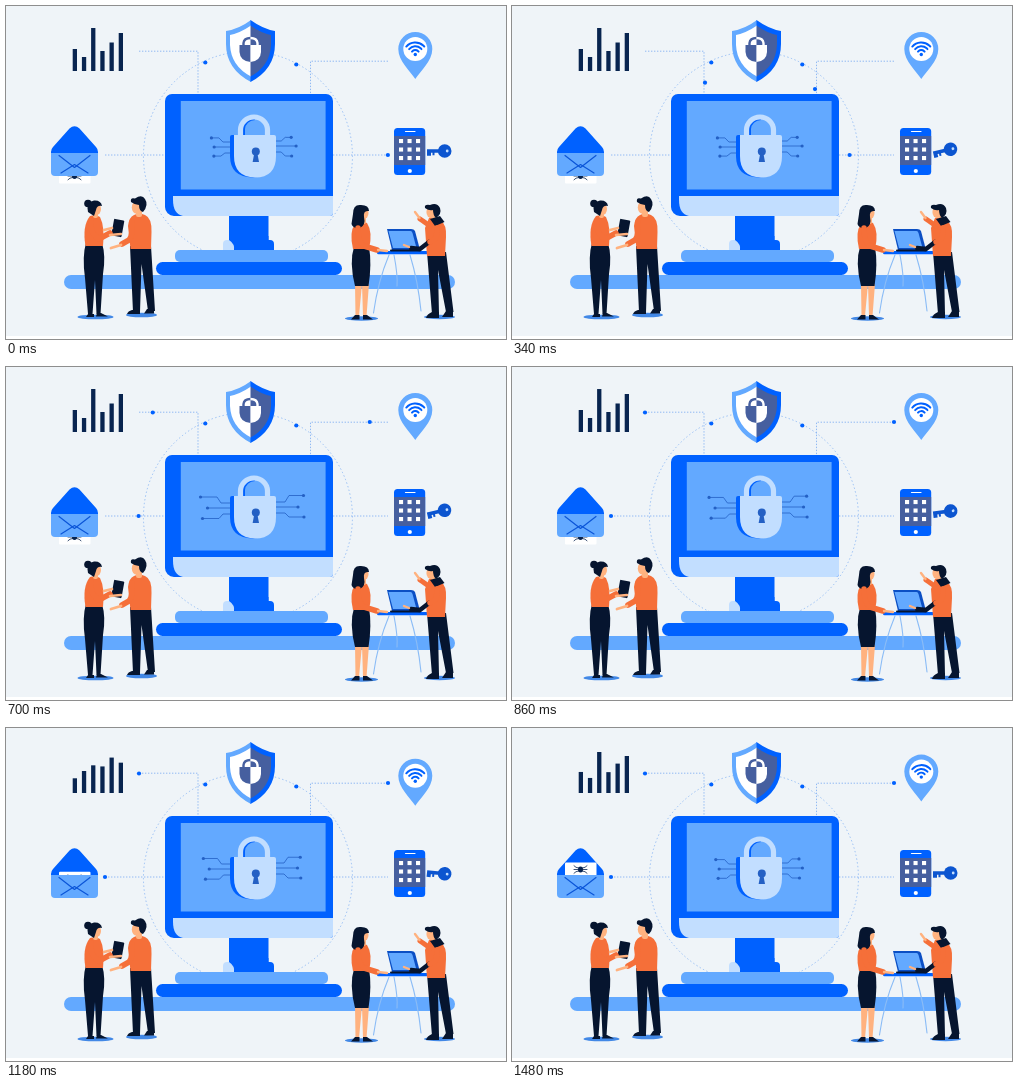
An HTML page with a canvas that plays this animation: 500x333 px, repeating every 1.5 s.

```html
<!DOCTYPE html>
<html lang="en">
<head>
<meta charset="utf-8">
<title>Data security</title>
<style>
html, body { margin: 0; width: 100%; height: 100%; overflow: hidden; background: #eff4f8; }
canvas { display: block; width: 100vw; height: 100vh; }
</style>
</head>
<body>
<canvas id="stage" width="500" height="333"></canvas>
<script>
const ctx = document.getElementById('stage').getContext('2d');
const LOOP = 1500;
const BG = '#eff4f8', BLUE = '#0061ff', SKY = '#63a9ff', PALE = '#c2deff', SLATE = '#465f9f',
  NAVY = '#08244f', INK = '#06152f', ORANGE = '#f56f39', SKIN = '#ffb27f', WIRE = '#2460c4',
  SHADE = '#4288e6';

// Linear track through [time, value] pairs.
function track(t, keys) {
  if (t <= keys[0][0]) return keys[0][1];
  for (let i = 1; i < keys.length; i++) {
    const [t0, v0] = keys[i - 1], [t1, v1] = keys[i];
    if (t <= t1) return v0 + (v1 - v0) * (t - t0) / (t1 - t0);
  }
  return keys[keys.length - 1][1];
}

function box(x, y, w, h, color, r = 0) {
  ctx.fillStyle = color;
  ctx.beginPath();
  ctx.roundRect(x, y, w, h, r);
  ctx.fill();
}

function oval(x, y, rx, color, ry = rx, angle = 0) {
  ctx.fillStyle = color;
  ctx.beginPath();
  ctx.ellipse(x, y, rx, ry, angle, 0, Math.PI * 2);
  ctx.fill();
}

function shape(d, color) {
  ctx.fillStyle = color;
  ctx.fill(new Path2D(d));
}

function line(d, color, width = 1, cap = 'round') {
  ctx.strokeStyle = color;
  ctx.lineWidth = width;
  ctx.lineCap = cap;
  ctx.lineJoin = 'round';
  ctx.stroke(new Path2D(d));
}

function dotted(d, color, gap, offset = 0) {
  ctx.setLineDash([1.4, gap]);
  ctx.lineDashOffset = offset;
  line(d, color, 0.9, 'butt');
  ctx.setLineDash([]);
}

// Dot travelling along a polyline; p is its progress from 0 to 1.
function traveller(points, p) {
  const lengths = points.slice(1).map((q, i) => Math.hypot(q[0] - points[i][0], q[1] - points[i][1]));
  let left = p * lengths.reduce((a, b) => a + b);
  let i = 0;
  while (i < lengths.length - 1 && left > lengths[i]) left -= lengths[i++];
  const k = left / lengths[i], [a, b] = [points[i], points[i + 1]];
  oval(a[0] + (b[0] - a[0]) * k, a[1] + (b[1] - a[1]) * k, 2.1, BLUE);
}

function routes(t) {
  dotted('M242 45.5 A104.5 104.5 0 1 1 241.9 45.5', '#8db8f4', 2.4, -t / LOOP * 15.2);
  for (const d of ['M133 45.2 H192 V88', 'M382 55.2 H304.500 V88', 'M99 149 H159', 'M327 149 H382']) {
    dotted(d, '#86b3f2', 1.6);
  }
  oval(199.3, 56.5, 2.1, BLUE);
  oval(290.3, 58.5, 2.1, BLUE);
  if (t < 430) traveller([[382, 149], [326, 149]], track(t, [[0, 0], [430, 1]]));
  if (t > 293) traveller([[193, 87], [193, 45.5], [133, 45.5]], track(t, [[293, 0], [765, 1]]));
  if (t > 325) traveller([[303, 87], [303, 55], [382, 55]], track(t, [[325, 0], [775, 1]]));
  if (t > 580) traveller([[159, 149], [99, 149]], track(t, [[580, 0], [855, 1]]));
}

function monitor() {
  box(223, 210, 39.5, 26, BLUE);
  shape('M217 244 V238 Q217 234 221 234 H232 V244 Z', PALE);
  shape('M228 244 Q229 238 223 234 V230 H262.500 V234 H264 Q268 234 268 238 V244 Z', BLUE);
  box(159, 88, 168, 122, BLUE, [7, 7, 3, 9]);
  box(174.8, 95, 144.8, 88.5, SKY);
  shape('M167 190 H327 V207 Q327 210 324 210 H177 Q167 208 167 194 Z', PALE);
  box(58, 269, 391, 14, SKY, 7);
  box(169, 244, 153, 12, SKY, 5);
  box(150, 256, 186, 13, BLUE, 6.5);
}

function circuits(t) {
  const e = track(t, [[0, 0.05], [170, 0.4], [340, 0.05], [640, 0.95], [700, 1], [860, 0.78],
    [1020, 0.42], [1080, 0.5], [1280, 1], [1320, 1], [1480, 0.2], [1500, 0.05]]);
  const wire = (x, y, nx, ny, bend) => {
    const dir = Math.sign(nx - x);
    line(`M${x} ${y} H${x + dir * bend} L${x + dir * (bend + 4)} ${ny} H${nx}`, WIRE, 0.8);
    oval(nx, ny, 1.6, WIRE);
  };
  wire(226, 136, 206 - 11.5 * e, 132 - 2 * e, 9 + 2 * e);
  wire(226, 141, 208.5 - 7 * e, 141, 8);
  wire(226, 147, 208.5 - 12 * e, 150 + 1.5 * e, 7 + 2 * e);
  wire(269, 135, 284.5 + 13 * e, 131.5 - 3 * e, 6 + 4 * e);
  wire(269, 140, 290 + 2 * e, 140, 8);
  wire(269, 146, 285 + 13 * e, 150, 6 + 4 * e);
}

function padlock() {
  line('M236.500 131 V123 A13 12 0 0 1 249 111.500', BLUE, 5, 'butt');
  line('M234.500 131 V124 A13.500 13 0 0 1 261.500 124 V131', PALE, 5.2, 'butt');
  shape('M224 131 Q224 129 226 129 H266 V151 Q266 171 247 171.500 Q224 171 224 150 Z', BLUE);
  shape('M228 129 H268 Q270 129 270 131 V150 Q270 171.500 249 171.500 Q228 171 228 150 Z', PALE);
  oval(249.800, 145.500, 4, WIRE);
  shape('M248.300 147 H251.300 L253 156 H246.600 Z', WIRE);
}

function shield() {
  shape('M245 14 Q233 23 220 25 V38 Q220 63 245 76 Z', SKY);
  shape('M244.500 14 Q257 23 269 25 V38 Q269 63 244.500 76 Z', BLUE);
  shape('M245 19.500 Q234 27 224 29 V39 Q225 60 245 70.500 Z', '#fff');
  shape('M244.500 19.500 Q255 27 265 29 V39 Q264 60 244.500 70.500 Z', SLATE);
  line('M237.500 41 V37 Q238 32 244.500 32', SLATE, 2.4, 'butt');
  line('M244.500 32 Q251 32 251.500 37 V41', '#fff', 2.4, 'butt');
  shape('M233.500 39 H244.500 V56 Q234 55 233.500 46 Z', SLATE);
  shape('M244.500 39 H255 V46 Q254.500 55 244.500 56 Z', '#fff');
}

function chart(m) {
  const tops = [[43, 53], [51, 40], [22, 43], [45, 36], [36.5, 27], [27, 37.500]];
  tops.forEach(([a, b], i) => {
    const y = a + (b - a) * m;
    box(66.7 + i * 9.2, y, 4.3, 65 - y, NAVY);
  });
}

function pin(m) {
  ctx.save();
  ctx.translate(409.3, 43 + 6.5 * m);
  shape('M0 30 C-5 22 -17 12 -17 0 A17 17 0 0 1 17 0 C17 12 5 22 0 30 Z', SKY);
  oval(0, 0, 12, '#fff');
  for (const r of [4.4, 8.2, 12]) {
    ctx.beginPath();
    ctx.arc(0, 5.5, r, -Math.PI * 0.77, -Math.PI * 0.23);
    ctx.strokeStyle = BLUE;
    ctx.lineWidth = 2;
    ctx.lineCap = 'round';
    ctx.stroke();
  }
  oval(0, 5.5, 1.7, BLUE);
  ctx.restore();
}

function phone() {
  box(388, 122, 31.2, 47, BLUE, 3.5);
  box(388, 130, 31.2, 29, SLATE);
  line('M399.500 125.500 H409', '#fff', 1.2);
  for (let i = 0; i < 9; i++) box(393 + i % 3 * 8.5, 133 + Math.floor(i / 3) * 8.5, 4.1, 4.1, '#fff');
  oval(403.8, 165, 2.1, '#fff');
}

function key(t) {
  const deg = track(t, [[0, 0], [340, -13], [520, -15], [700, -13], [860, -7], [1080, 15], [1250, 0]]);
  ctx.save();
  ctx.translate(431, 145);
  ctx.rotate(deg * Math.PI / 180);
  const blue = '#0c55d0';
  shape('M-10 -1.800 H3 V1.800 H-2.500 V4.200 H-4.500 V1.800 H-6 V4.800 H-10 Z', blue);
  oval(7.7, 0, 6.8, blue);
  oval(10.2, 0, 1.4, PALE);
  ctx.restore();
}

function envelope(t) {
  const y = track(t, [[0, 163], [1000, 163], [1080, 155.5], [1260, 134.5]]);
  shape('M45 148 V146 Q45 143 47 141 L63.500 122.500 Q68.500 118 73.500 122.500 L90 141 Q92 143 92 146 V148 Z', BLUE);
  box(53, y, 31.5, 14.5, '#fff', 1);
  oval(68.5, y + 7, 2.5, NAVY, 3);
  for (const s of [-1, 1]) for (const k of [-1, 0, 1]) {
    line(`M68.500 ${y + 7 + k} L${68.5 + s * 4.5} ${y + 7 + k * 2.2} l${s * 2} ${k * 1.6}`, NAVY, 0.8);
  }
  box(45, 147, 47, 23, SKY, [0, 0, 4, 4]);
  line('M53 149.500 L68.500 161.500 L84 149.500 M55 167 L68.500 158.500 L82 167', '#0b55d8', 1.2);
}

function leftPair() {
  oval(89.5, 311, 18, SHADE, 2.3);
  oval(135.5, 309, 15.5, SHADE, 2.3);

  // Woman with tablet
  shape('M82 308 H88 V311 H80 Z M91 307 H95 L102 310.500 H90 Z', INK);
  shape('M80 237 H96 Q100 250 97 268 L94.500 308 H90.500 L89 274 L86.500 308 H82 L79 272 Q76 250 80 237 Z', INK);
  shape('M84 210 Q90 208 94 211 Q99 221 97 240 H79.500 Q76 220 84 210 Z', ORANGE);
  box(87, 205, 5, 7, SKIN, 2);
  oval(90.5, 203, 4.5, SKIN, 6);
  oval(82, 197.5, 3.8, INK);
  shape('M82 206 Q80 196 88 194.500 Q95 194 96 200 Q91 199 90 204 L88 210 Z', INK);
  ctx.save();
  ctx.translate(111.8, 222);
  ctx.rotate(0.18);
  box(-5.2, -8.5, 10.4, 17, INK, 1);
  ctx.restore();
  line('M85 215 Q84 228 93 233 L104 227', ORANGE, 5.5);
  line('M104 229 L115 228 M98 224 L106 222', SKIN, 2.6);

  // Man reaching out
  shape('M126 304 H134 V308 H121 Q122 305 126 304 Z M141 303 H148 V307.500 H138 Z', INK);
  shape('M124 240 H145 L149 305 H142 L135.500 258 L134 306 H127 Z', INK);
  shape('M128 209 Q133 206 139 209 Q146 212 145.500 226 L145 243 H124.500 L122 220 Q123 211 128 209 Z', ORANGE);
  box(130, 204, 6, 7, SKIN, 2);
  oval(130.5, 201.5, 4.7, SKIN, 6.2);
  shape('M125 196 Q124 191 129 192.500 Q136 188 139 193 Q143 199 137 206 Q133 205 133 199 Q129 199 125 196 Z', INK);
  line('M126 216 Q127 229 123 234 L116 238', ORANGE, 5.5);
  line('M115 239 L105 242', SKIN, 2.8);
}

function rightPair() {
  oval(355.5, 312.500, 16.5, SHADE, 2.2);
  oval(433.5, 311, 15.5, SHADE, 2.2);

  // Table and laptop
  line('M383 249 Q372 275 367.500 307 M388 249 Q392 270 391 280 M404 249 Q412 275 415 305', '#8bbcf6', 1.1);
  box(371, 245, 51, 3.2, BLUE, 1.5);
  shape('M381 223 H405 Q408 223 409 225 L414 244 H386 Z', '#0b4fc4');
  shape('M382.500 225 H404.500 Q406 225 406.500 227 L410.500 242 H387 Z', SKY);
  box(384, 243.500, 31, 2, INK, 1);

  // Woman by the table
  shape('M349 278 H356 L353 310 H349.500 Z M356 278 H363 L360.500 310 H357 Z', SKIN);
  shape('M349 309 H353.500 V313.500 H345 Z M357 309 H361 L367 313.500 H357 Z', INK);
  shape('M348 241 H363 Q366 258 362.500 280 H349 Q343 256 348 241 Z', INK);
  shape('M349 218 Q355 214 361 217 Q367 226 363 243 H347 Q343 226 349 218 Z', ORANGE);
  box(355, 211, 5, 7, SKIN, 2);
  oval(358, 207, 4.5, SKIN, 6);
  shape('M347 208 Q347 198 355 199 Q363 199 363 205 Q357 204 358 211 Q360 219 354 222 Q347 223 345.500 218 Z', INK);
  line('M352 222 Q352 236 358 240 L371 244', ORANGE, 5.5);
  line('M372 244 L381 245', SKIN, 2.4);

  // Man pointing
  shape('M426 306 H433 V312 H420 Q421 308 426 306 Z M440 305 H447 V311 H436 Z', INK);
  shape('M421 246 H440 L447.500 306 H440 L432 264 L433 308 H426 Z', INK);
  shape('M423 212 Q429 209 434 213 Q441 219 440 231 L439 250 H421 L419 222 Z', ORANGE);
  box(425, 207, 6, 6, SKIN, 2);
  oval(425, 206, 4.6, SKIN, 6);
  shape('M419 202 Q418 198 424 199 Q431 196 434 202 Q436 208 430 212 Q427 209 427 204 Q423 205 419 202 Z', INK);
  shape('M424 213 L434 210 L438.500 216 L429 220 Z', INK);
  line('M424 220 L417 215 L414 213', ORANGE, 5);
  line('M413.500 212 L409 206', SKIN, 2.4);
  line('M423 236 L414 243 L405 242', INK, 4.5);
  line('M431 222 Q432 233 424 236', ORANGE, 5.5);
  line('M403 241 L398 239', SKIN, 2.4);
}

function draw(now) {
  const t = now % LOOP;
  const swing = track(t, [[860, 0], [1300, 1], [1500, 0]]);
  box(0, 0, 500, 333, '#fff');
  box(0, 0, 500, 330, BG);
  routes(t);
  monitor();
  circuits(t);
  padlock();
  shield();
  chart(swing);
  pin(swing);
  phone();
  key(t);
  envelope(t);
  leftPair();
  rightPair();
}

const start = performance.now();
function tick() {
  draw(performance.now() - start);
  requestAnimationFrame(tick);
}
tick();
</script>
</body>
</html>
```
